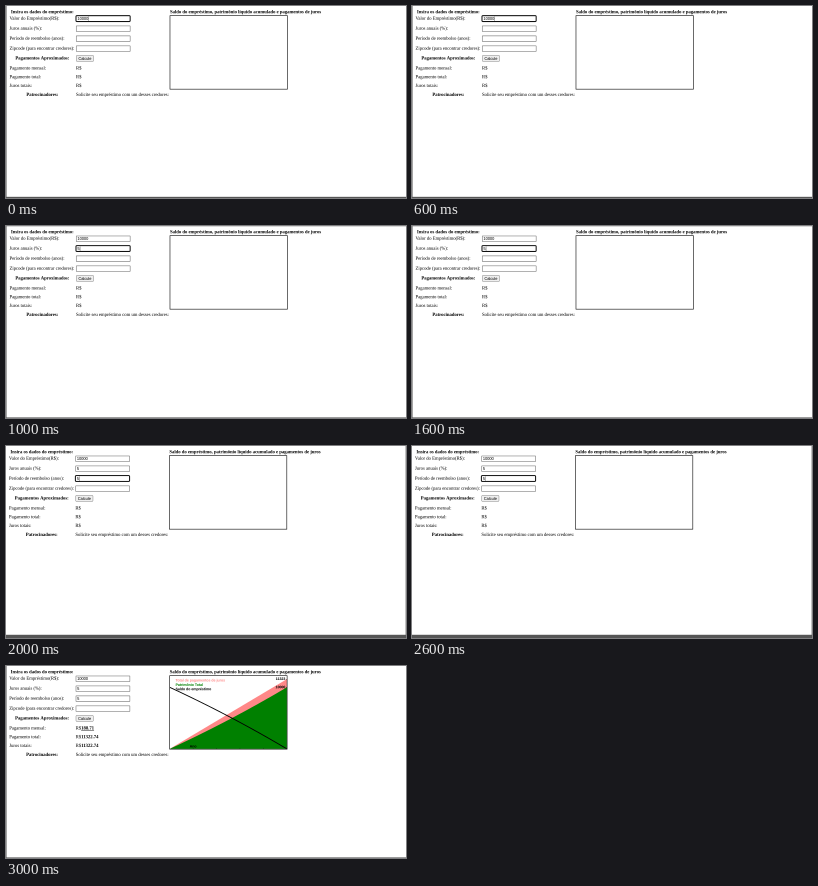
An HTML page with a canvas for the animation above (4 s loop, 400 px wide and 192 px high).

```html
<!DOCTYPE html>
<html lang="pt">
<head>
<meta charset="utf-8">
<style>
  html, body { margin: 0; width: 100%; height: 100%; overflow: hidden; background: #fff; }
  canvas { display: block; width: 100vw; height: 100vh; }
</style>
</head>
<body>
<canvas id="stage" width="400" height="192"></canvas>
<script>
const makeCanvas = (width, height) => Object.assign(document.createElement('canvas'), { width, height });
const stage = document.getElementById('stage');
const half = makeCanvas(800, 384);
const page = makeCanvas(1600, 768);
const ctx = page.getContext('2d');
const W = 1366, H = W * 192 / 400;
ctx.scale(page.width / W, page.width / W);

const SERIF = '"Liberation Serif", "Times New Roman", serif';
const SANS = '"Liberation Sans", Arial, sans-serif';
const LEFT = 11, MID = 123, FIELD = 238;
const GRAPH = { x: 559, y: 33, w: 400, h: 250 };
const loan = { principal: 10000, rate: 0.05 / 12, months: 60 };
const growth = (1 + loan.rate) ** loan.months;
loan.monthly = loan.principal * growth * loan.rate / (growth - 1);
loan.total = loan.monthly * loan.months;

// Each step: focused field, field values, window edges
const steps = [
  { focus: 0, values: ['10000'], shift: 1, bar: 4 },
  { focus: 1, values: ['10000', '5'], shift: 1, bar: 2, top: true },
  { focus: 2, values: ['10000', '5', '5'], shift: -1, bar: 11 },
  { focus: -1, values: ['10000', '5', '5'], shift: 0, bar: 2, done: true }
];

function text(str, x, y, { font = SERIF, size = 16, weight = 'normal', align = 'left', color = '#000', base = 'alphabetic' } = {}) {
  ctx.font = `${weight} ${size}px ${font}`;
  ctx.textAlign = align;
  ctx.textBaseline = base;
  ctx.fillStyle = color;
  ctx.fillText(str, x, y);
  return ctx.measureText(str).width;
}

function rect(x, y, w, h, color) {
  ctx.fillStyle = color;
  ctx.fillRect(x, y, w, h);
}

function box(x, y, w, h, radius, line, stroke, fill) {
  ctx.beginPath();
  ctx.roundRect(x, y, w, h, radius);
  ctx.fillStyle = fill;
  ctx.fill();
  ctx.lineWidth = line;
  ctx.strokeStyle = stroke;
  ctx.stroke();
}

function field(row, value, focused) {
  const y = 33 + row * 34;
  if (focused) box(FIELD, y, 185, 20, 3, 3.5, '#101010', '#fff');
  else box(FIELD + 1, y + 1, 184, 19, 1, 2, '#767676', '#fff');
  const w = text(value, FIELD + 5, y + 15, { font: SANS, size: 13.333 });
  if (focused) rect(FIELD + 6 + w, y + 3, 1, 15, '#000');
}

function result(value, y, underline) {
  const x = FIELD + text('R$', FIELD, y);
  if (!value) return;
  const w = text(value, x, y, { weight: 'bold' });
  if (underline) rect(x, y + 2, w, 1.5, '#000');
}

function chart() {
  const { w, h } = GRAPH;
  const toX = n => n * w / loan.months;
  const toY = a => h - a * h / (loan.total * 1.05);
  const label = (str, x, y, opts) => text(str, x, y, { font: SANS, size: 12, weight: 'bold', ...opts });
  const balance = n => loan.principal * (growth - (1 + loan.rate) ** n) / (growth - 1);
  const trace = amount => {
    for (let n = 0; n <= loan.months; n++) ctx.lineTo(toX(n), toY(amount(n)));
  };
  const area = (amount, color) => {
    ctx.beginPath();
    ctx.moveTo(0, h);
    trace(amount);
    ctx.lineTo(w, h);
    ctx.closePath();
    ctx.fillStyle = color;
    ctx.fill();
  };

  ctx.save();
  ctx.translate(GRAPH.x, GRAPH.y);
  ctx.beginPath();
  ctx.rect(0, 0, w, h);
  ctx.clip();
  area(n => n * loan.monthly, '#f88');
  area(n => loan.principal - balance(n), 'green');
  ctx.beginPath();
  trace(balance);
  ctx.lineWidth = 3;
  ctx.strokeStyle = '#000';
  ctx.stroke();

  label('Total de pagamentos de juros', 20, 20, { color: '#f88' });
  label('Patrimônio Total', 20, 35, { color: 'green' });
  label('Saldo do empréstimo', 20, 50);
  for (let year = 1; year * 12 <= loan.months; year++) rect(toX(year * 12) - 0.5, h - 3, 1, 3, '#000');
  label('Ano', toX(12), h - 5, { align: 'center' });
  for (const amount of [loan.total, loan.principal]) {
    rect(w - 3, toY(amount) - 0.5, 3, 1, '#000');
    label(amount.toFixed(0), w - 5, toY(amount), { align: 'right', base: 'middle' });
  }
  ctx.restore();
}

// Halving twice averages the page down smoothly
function shrink(from, to) {
  to.getContext('2d').drawImage(from, 0, 0, to.width, to.height);
}

function draw(step) {
  const head = { weight: 'bold', align: 'center' };
  rect(0, 0, W, H, '#fff');

  ctx.save();
  ctx.translate(step.shift, 0);
  text('Insira os dados do empréstimo:', MID, 25, head);
  text('Saldo do empréstimo, patrimônio líquido acumulado e pagamentos de juros', GRAPH.x, 25, { weight: 'bold' });

  ['Valor do Empréstimo(R$):', 'Juros anuais (%):', 'Período de reembolso (anos):', 'Zipcode (para encontrar credores):']
    .forEach((name, i) => {
      text(name, LEFT, 47 + i * 34);
      field(i, step.values[i] || '', i === step.focus);
    });

  text('Pagamentos Aproximados:', MID, 183, head);
  box(FIELD + 1, 169, 59, 20, 3, 1.5, '#767676', '#efefef');
  text('Calcule', FIELD + 30.5, 184, { font: SANS, size: 13.333, align: 'center' });

  const total = step.done && loan.total.toFixed(2);
  text('Pagamento mensal:', LEFT, 217);
  result(step.done && loan.monthly.toFixed(2), 217, true);
  text('Pagamento total:', LEFT, 247);
  result(total, 247);
  text('Juros totais:', LEFT, 277);
  result(total, 277);

  text('Patrocinadores:', MID, 307, head);
  text('Solicite seu empréstimo com um desses credores:', FIELD, 307);

  if (step.done) chart();
  ctx.lineWidth = 2;
  ctx.strokeStyle = '#000';
  ctx.strokeRect(GRAPH.x, GRAPH.y, GRAPH.w + 1, GRAPH.h + 1);
  ctx.restore();

  if (step.shift < 0) rect(W - 1.5, 0, 1.5, H, '#777');
  else rect(0, 0, 2, H, '#666');
  if (step.top) rect(0, 0, W, 1, '#777');
  rect(0, H - step.bar, W, step.bar, '#555');

  shrink(page, half);
  shrink(half, stage);
}

let shown = -1;
const start = performance.now();
function tick() {
  const index = Math.floor((performance.now() - start) % 4000 / 1000);
  if (index !== shown) draw(steps[shown = index]);
  requestAnimationFrame(tick);
}
tick();
</script>
</body>
</html>
```
